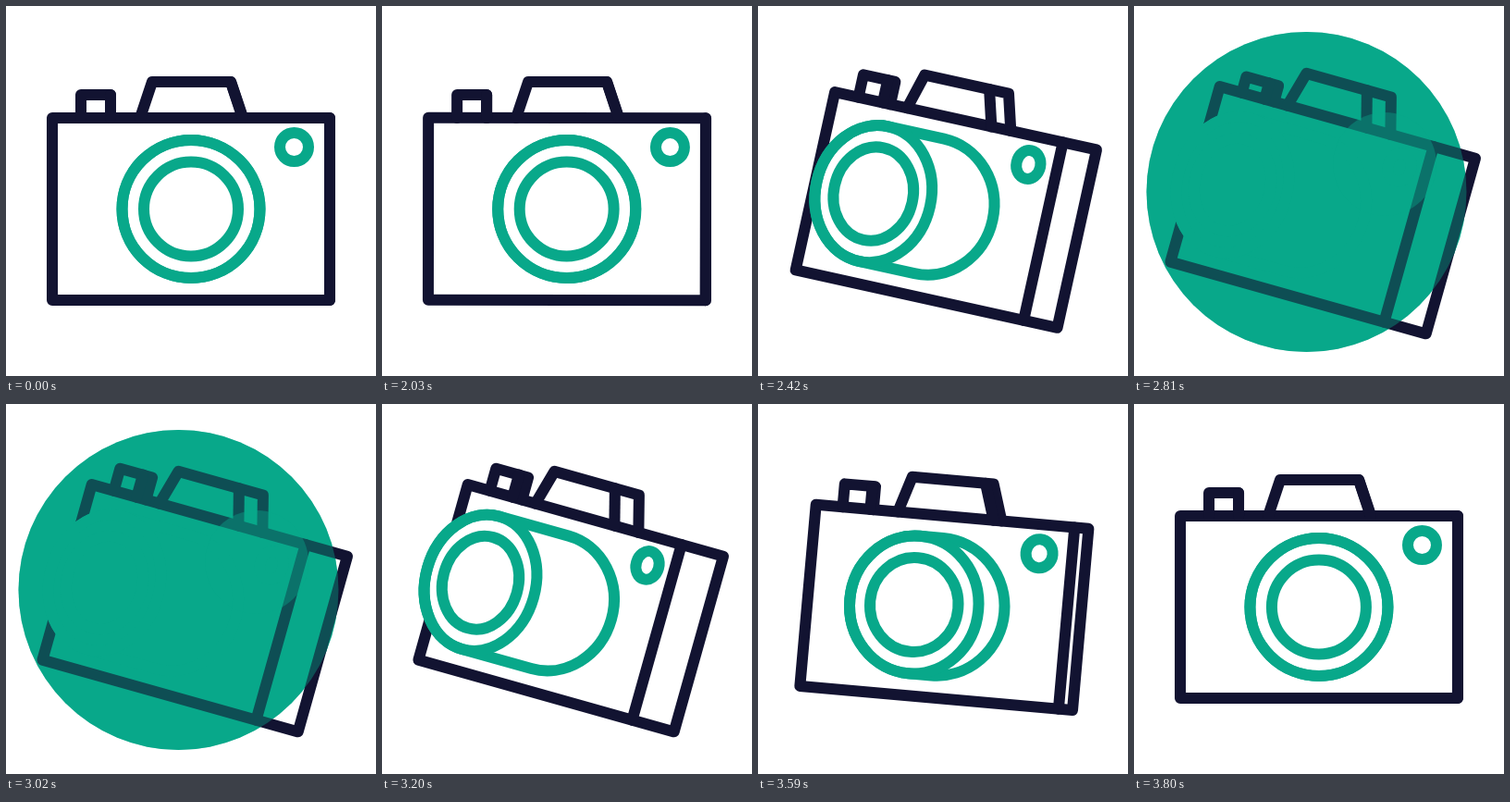
These frames come from a looping animation (400x400 px, 3830 ms). An HTML page with a canvas:

```html
<!DOCTYPE html>
<html lang="en">
<head>
<meta charset="utf-8">
<title>Camera</title>
<style>
  html, body { margin: 0; width: 100%; height: 100%; overflow: hidden; background: #fff; }
  canvas { display: block; width: 400px; height: 400px; }
</style>
</head>
<body>
<canvas id="stage" width="400" height="400"></canvas>
<script>
const ctx = document.getElementById('stage').getContext('2d');
const DARK = '#121331', GREEN = '#08a88a', WHITE = '#fff';
const LOOP = 3830, START = 2030, STEP = 30;
const HALF_W = 150, HALF_H = 98.5, RING = 74.5;

// [time, value] tables, eased between neighbours
const TURN = [[2010, 0], [2590, 1], [3230, 1], [3810, 0]];
const PRESS = [[2600, 0], [2770, 7], [2820, 7], [3010, 0]];
const FLASH = [2750, 3065];

const smooth = u => u * u * (3 - 2 * u);

function track(keys, t) {
  if (t <= keys[0][0]) return keys[0][1];
  for (let i = 1; i < keys.length; i++) {
    const [t0, a] = keys[i - 1], [t1, b] = keys[i];
    if (t < t1) return a + (b - a) * smooth((t - t0) / (t1 - t0));
  }
  return keys[keys.length - 1][1];
}

function line(points, close) {
  ctx.beginPath();
  points.forEach(([x, y]) => ctx.lineTo(x, y));
  if (close) ctx.closePath();
  ctx.stroke();
}

function ring(x, y, rx, ry) {
  ctx.beginPath();
  ctx.ellipse(x, y, rx, ry, 0, 0, Math.PI * 2);
  ctx.stroke();
}

function disc(x, y, r, alpha) {
  ctx.globalAlpha = alpha;
  ctx.fillStyle = GREEN;
  ctx.beginPath();
  ctx.arc(x, y, r, 0, Math.PI * 2);
  ctx.fill();
  ctx.globalAlpha = 1;
}

function drawBody(turn, press, face) {
  const right = HALF_W - 6.5 * turn, edge = right - 47 * turn;
  const top = -HALF_H, shift = dx => x => face(x) + dx * turn;
  ctx.strokeStyle = DARK;
  line([[-right, top], [right, top], [right, HALF_H], [-right, HALF_H]], true);
  line([[edge, top], [edge, HALF_H]]);

  const far = shift(27), roof = -137.5;
  line([[face(-55), top], [face(-42), roof], [far(43), roof], [far(56), top]]);
  line([[face(43), roof], [face(56), top]]);

  const side = shift(10.5), cap = -123.5 + press;
  line([[face(-119), top], [face(-119), cap], [side(-87), cap], [side(-87), top]]);
  line([[face(-87), cap], [face(-87), top]]);
}

function drawLens(turn, scale, face, fill) {
  const back = face(0), front = back - 78 * turn;
  ctx.strokeStyle = GREEN;
  ctx.fillStyle = fill;
  // barrel: far half of the base, near half of the front
  ctx.beginPath();
  ctx.ellipse(back, 0, RING * (1 - 0.075 * turn), RING, 0, -Math.PI / 2, Math.PI / 2);
  ctx.ellipse(front, 0, RING * scale, RING, 0, Math.PI / 2, Math.PI * 1.5);
  ctx.closePath();
  ctx.fill();
  ctx.stroke();
  ring(front, 0, RING * scale, RING);
  ring(front, 0, 51 * scale, 51);
  ring(face(111.5) + 1.5 * turn, -67, 15.5 * scale, 15.5);
}

function draw(t) {
  const turn = track(TURN, t), press = track(PRESS, t);
  const lit = t >= FLASH[0] && t < FLASH[1];
  const scale = 1 - 0.2 * turn;
  const face = x => x * scale - 23.5 * turn;

  ctx.fillStyle = WHITE;
  ctx.fillRect(0, 0, 400, 400);
  if (lit) disc(186.5, 201, 173, 1);

  ctx.save();
  ctx.translate(200 + 4.2 * turn, 219.5 + 1.2 * turn);
  ctx.rotate(15.7 * turn * Math.PI / 180);
  ctx.lineWidth = 12;
  ctx.lineJoin = ctx.lineCap = 'round';
  drawBody(turn, press, face);
  drawLens(turn, scale, face, lit ? GREEN : WHITE);
  ctx.restore();

  if (lit) {
    disc(186.5, 201, 173, 0.4);
    disc(271, 171, 56, 0.4);
  }
}

const origin = performance.now();
function tick() {
  const t = Math.max(0, performance.now() - origin) % LOOP;
  draw(t < START ? 0 : START + Math.floor((t - START) / STEP) * STEP);
  requestAnimationFrame(tick);
}
tick();
</script>
</body>
</html>
```
